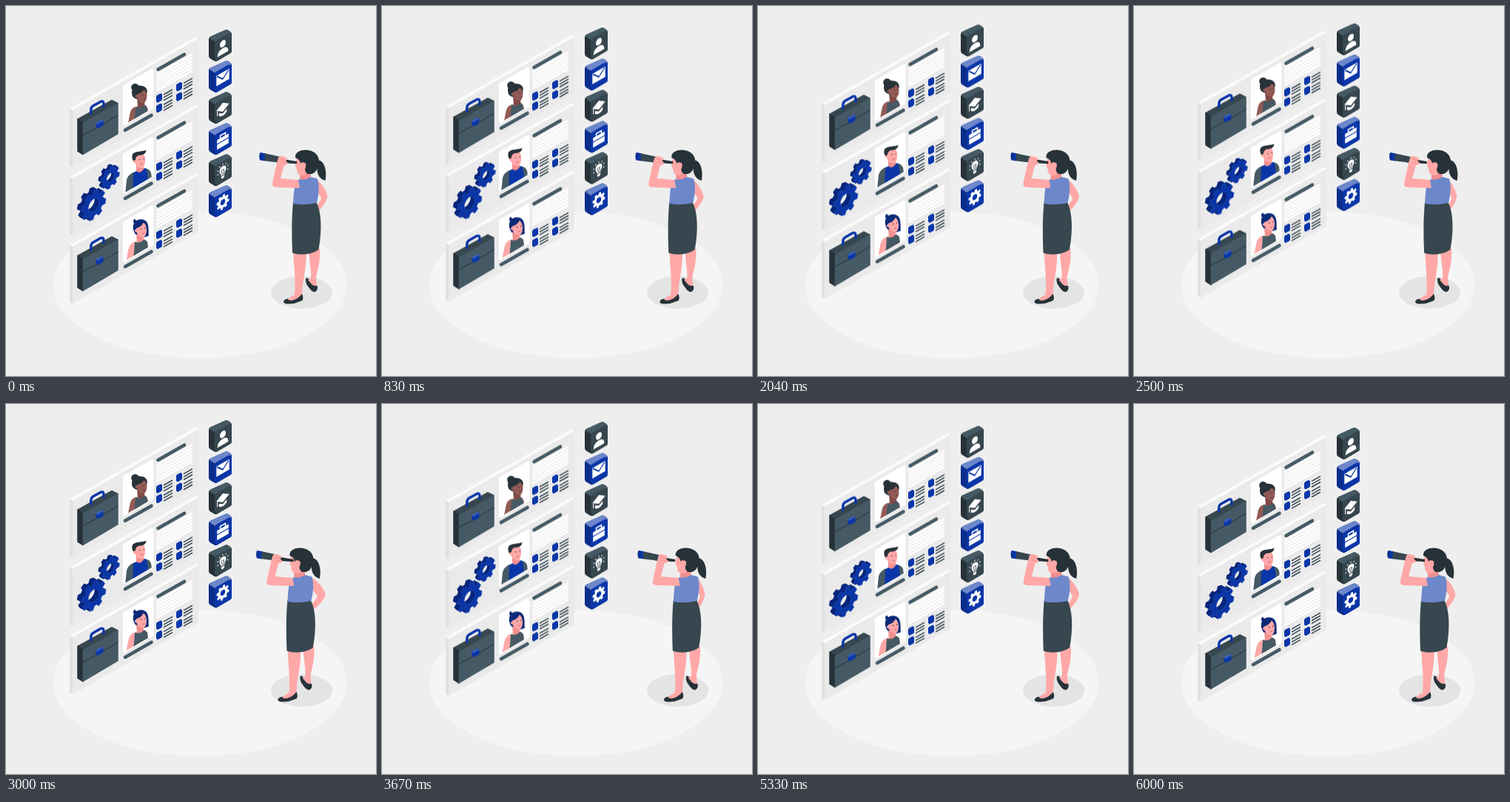
An HTML page for the animation above (6040 ms loop, 500x500 px).

```html
<!DOCTYPE html>
<html lang="en">
<head>
<meta charset="utf-8">
<title>Candidate search</title>
<style>
  @property --sway { syntax: "<number>"; inherits: true; initial-value: 0; }
  html, body { margin: 0; width: 100%; height: 100%; overflow: hidden; background: #eee; }
  svg { display: block; width: 100vw; height: 100vh; }
  .float { animation: float 6040ms linear infinite; }
  .sway { animation: sway 6040ms linear infinite; transform: translateX(calc(var(--sway) * 1.9px)); }
  .scope { transform: translateX(calc(var(--sway) * -.85px)); }
  .elbow { transform-origin: 417px 258px; transform: scaleX(calc(1 - var(--sway) * .07)); }

  /* Six seconds of motion, then a 40 ms hold. */
  @keyframes float {
    0%, 99.34% { transform: translateY(0); }
    49.67% { transform: translateY(-10px); }
  }
  @keyframes sway {
    0%, 99.34%, 100% { --sway: 0; }
    9.93%, 89.4% { --sway: -1; }
    19.87%, 79.47% { --sway: 2; }
    29.8%, 49.67%, 69.54% { --sway: -4; }
    39.74%, 59.6% { --sway: 4; }
  }
</style>
</head>
<body>
<svg viewBox="0 0 500 500">
  <defs>
    <clipPath id="crop"><path d="M158 90H199V137.5L158 161.5Z"/></clipPath>

    <g id="case" stroke-linejoin="round">
      <path d="M97 153 143 127.500 151 131.500 104 158.500Z" fill="#37474f" stroke="#37474f" stroke-width="1.500"/>
      <path d="M97 153 104 158V200.500L97 196Z" fill="#263238" stroke="#263238" stroke-width="1.500"/>
      <path d="M104.500 158.500 151 132V172.500L104.500 200Z" fill="#455a64" stroke="#455a64" stroke-width="1.500"/>
      <path d="M104 174.500 126 163 151.500 147.500" fill="none" stroke="#263238" stroke-width="1"/>
      <path d="M114.800 146.500V140Q115 136.500 118 134.800L128 129.200Q131.800 127.800 132 131.500V137" fill="none" stroke="#0b36a8" stroke-width="3.400"/>
      <path d="M121 158 130 153.500 131.500 155V161.500L124 165.500 121.500 163.500Z" fill="#0b36a8"/>
      <path d="M121 158 130 153.500 131.500 155 123 160Z" fill="#3e62c0"/>
    </g>

    <g id="p0">
      <path d="M164 163 168 143Q170 137 176 136L187 133Q191 135 192 141L193 150Z" fill="#935a55"/>
      <path d="M172 162 174 148 175 136 179 138 187 134 190 136 193 152Z" fill="#455a64"/>
      <path d="M177 124H188L187 134Q182 139 178 136Z" fill="#7f4a47"/>
      <circle cx="174.500" cy="110" r="5.300" fill="#263238"/>
      <path d="M170 117C170 109 178 106 184 108 190 109 191.500 114 190.500 118L178 126Q170 125 170 117Z" fill="#263238"/>
      <path d="M177 119Q184 118 186 113 190 115 190.500 121 190 130 186 131 178 130 177 123Z" fill="#935a55"/>
      <path d="M184 120.500h1.500M188.500 119.500h1.200" stroke="#263238"/>
      <path d="M185.500 126.500 188.500 125.500" stroke="#5d3232" stroke-width=".8"/>
      <circle cx="176.500" cy="122" r="2" fill="#935a55"/>
    </g>

    <g id="p1">
      <path d="M161 163 163 143Q164 137 171 133L188 127Q194 128 196 133L198 148Z" fill="#455a64"/>
      <path d="M171 160 172 134 177 130 187 127 190 128 193 148Z" fill="#0b36a8"/>
      <path d="M176 122H186V128Q182 135 176 131Z" fill="#f28f8f"/>
      <path d="M173 113Q174 107 181 106 188 107 188 114 188.500 125 184 127 176 127 174.500 120Z" fill="#ffa8a7"/>
      <path d="M172.500 118C169.500 113 170 109 172 107 176 103.500 183 105 189.500 102.500 189 107 186 109.500 178.500 109.500L175.500 112.500 174.500 118Z" fill="#263238"/>
      <circle cx="174" cy="118" r="2" fill="#ffa8a7"/>
      <path d="M180 115.500h1.500M185.500 114.500h1.300" stroke="#263238" stroke-width="1.100"/>
      <path d="M181.500 122 185 121" stroke="#b55b5b" stroke-width=".8"/>
    </g>

    <g id="p2">
      <path d="M162 163 165 146Q167 136 174 134L188 131Q192 133 193 150Z" fill="#ffa8a7"/>
      <path d="M171 162 173 149 174 134.500 178 135 187 131 191 134 193 151Z" fill="#455a64"/>
      <path d="M172 112C174 104 184 101 190 107 194 113 192 123 193 126L187 128 175 124Q171 118 172 112Z" fill="#0b2a78"/>
      <path d="M176 124H186V131Q181 137 177 134Z" fill="#f28f8f"/>
      <path d="M176 116Q183 114 186 108 190 112 190 118 190 126 186 128 178 127 176 120Z" fill="#ffa8a7"/>
      <path d="M172.500 109Q171 105 174 103 175 106 180 106" fill="#0b2a78"/>
      <circle cx="176" cy="119" r="2" fill="#ffa8a7"/>
      <path d="M182 117h1.500M187 116h1.300" stroke="#263238" stroke-width="1.100"/>
      <path d="M183.500 123.500 187 122.500" stroke="#b55b5b" stroke-width=".8"/>
    </g>
  </defs>

  <ellipse cx="262" cy="377" rx="198.500" ry="99" fill="#f5f5f5"/>
  <ellipse cx="399.500" cy="387" rx="41.500" ry="22" fill="#e4e4e4"/>
  <g class="float" id="wall"></g>

  <g class="sway">
    <path class="elbow" d="M420 235C426 238 433 250 434.500 257 434 264 426 273 421 279L417 277C420 269 426 263 426 259L419 249Z" fill="#ffa8a7"/>
    <path d="M405 368.500Q407 366 410 370 413 377 419 377L421 379Q421.500 385 417 386.500 413 386 409 380 404.500 375 405 368.500Z" fill="#263238"/>
    <path d="M409 328H424C425 348 421 356 419 367L420 377Q418 380 413 376L408 370 412 368C413 358 410 348 409 328Z" fill="#ffa8a7"/>
    <path d="M388 330H405.500C406.500 350 403 362 401 376L400 391Q398 396 391 397L380 399 379 397 390 390C392 374 389 352 388 330Z" fill="#ffa8a7"/>
    <path d="M375 399.500Q376 396 381 395.500 381 398 386 398 395 396 400 389 402.500 394 400.500 398 398 399 395 400 389 403 380 402.500 375 402 375 399.500Z" fill="#263238"/>
    <path d="M388 265H419.500C426 279 427.500 300 422.500 329 414 336 397 337.500 387 333.500 386 308 386 286 388 265Z" fill="#37474f"/>
    <path d="M397 226 411 223 412 233Q404 239 397 234Z" fill="#f28f8f"/>
    <path d="M396 234Q404 236 412 231L421 233.500Q425 246 420 266 403 270 388 267 389 247 391 240Z" fill="#6d87cb"/>
    <path d="M392 207 404 203 411 216 407 226Q403 230 397 228 393 227 393 220L391 216Z" fill="#ffa8a7"/>
    <path d="M391 205C390 197 399 194 406 194.500 415 195 422 200 423 208.500 431 210 434 225 431.500 236 424 234 420 227 420.500 220 418 226 412 229 406 226L404 222 405 213 400 211 398 213Q397 207 391 205Z" fill="#263238"/>
    <ellipse cx="402.500" cy="215.500" rx="2.800" ry="4" fill="#ffa8a7"/>
    <g class="scope">
      <path d="M366 205.500 393 210V213.200L366 211.500Z" fill="#263238"/>
      <path d="M348 198.800 371 203.800 370 211.800 347 209Z" fill="#37474f"/>
      <path d="M344 198 350.500 199.200Q348.500 204 349.500 209.300L344 208.500Z" fill="#0b36a8"/>
      <ellipse cx="344.300" cy="203.200" rx="2" ry="5.300" fill="#0a2f92"/>
    </g>
    <path d="M366 212 368 205Q370 202 373 203L379 205Q381 208 378 209L381 212Q380 215 376 215L371 233 395 235 397 246 366 245Q359 245 360 239Z" fill="#ffa8a7"/>
    <path d="M371 207 378 209M371.500 211 379 212.500" stroke="#f28f8f" stroke-width=".8"/>
  </g>
</svg>
<script>
  const BLUE = '#0b36a8', NAVY = '#08267c', DARK = '#37474f';
  const SLOPE = -.568;
  const range = n => [...Array(n).keys()];
  const each = (n, draw) => range(n).map(draw).join('');

  const slant = (x, y, w, size, color, cap = 'round') =>
    `<path d="M${x} ${y}l${w} ${w * SLOPE}" stroke="${color}" stroke-width="${size}" stroke-linecap="${cap}"/>`;

  // Filled shape whose corners are rounded by a stroke of the same colour.
  const soft = (d, color, round) =>
    `<path d="${d}" fill="${color}" stroke="${color}" stroke-width="${round}" stroke-linejoin="round"/>`;

  // Toothed ring around the origin.
  function gear(r, hole, teeth = 8) {
    const shape = [[-.34, .76], [-.2, 1], [.2, 1], [.34, .76]];
    const points = range(teeth).flatMap(i => shape.map(([a, k]) => {
      const angle = (i + a) * 2 * Math.PI / teeth + .2;
      return `${(Math.cos(angle) * k * r).toFixed(2)} ${(Math.sin(angle) * k * r).toFixed(2)}`;
    }));
    return `M${points.join('L')}ZM${hole} 0A${hole} ${hole} 0 1 0 ${-hole} 0A${hole} ${hole} 0 1 0 ${hole} 0Z`;
  }

  function solidGear(x, y, r, hole, depth) {
    const layers = depth * 2;
    return each(layers + 1, i => {
      const back = (layers - i) / 2;
      const front = i === layers;
      return `<path d="${gear(r, hole)}" fill="${front ? BLUE : NAVY}" fill-rule="evenodd"
        transform="matrix(.866 -.5 0 1 ${x - back} ${y - back * .55})"
        ${front ? 'stroke="#2f55b8" stroke-width=".5"' : ''}/>`;
    });
  }

  const detail = (x, y) =>
    soft(`M${x + 2} ${y + 2.6}l4 -2.300v5.800l-4 2.300Z`, BLUE, 4)
    + each(3, i => slant(x + 10.5, y - .5 + i * 3.9, 11, 1.5, DARK));

  function board(i) {
    const art = i === 1
      ? solidGear(141, 139.5, 14.5, 6, 4) + solidGear(118.5, 177, 19.2, 8.4, 6)
      : '<use href="#case"/>';
    return `<g transform="translate(0 ${i * 92.2})">
      <path d="M86 138.500 256.500 41.500 260 44 90 141Z" fill="#fafafa"/>
      <path d="M86 138.500 90 141V218L86 215.500Z" fill="#e0e0e0"/>
      <path d="M90 141 260 44.400V121.400L90 218Z" fill="#eaeaea"/>
      ${art}
      ${soft('M160 108.500 197.500 87V137.500L160 159.500Z', '#fff', 4)}
      <g clip-path="url(#crop)"><use href="#p${i}"/></g>
      ${slant(161, 167.8, 35.5, 4.6, '#455a64')}
      ${slant(205.5, 85.7, 35.5, 4.6, '#455a64')}
      ${each(6, k => slant(203, 93 + k * 4.4, 49, 2.7, '#fff', 'butt'))}
      ${detail(203, 120)}${detail(203, 133.5)}${detail(230, 104.7)}${detail(230, 118.2)}
    </g>`;
  }

  const rays = each(7, i => {
    const a = Math.PI * (1 + (i - .5) / 5);
    const at = r => `${(Math.cos(a) * r).toFixed(1)} ${(Math.sin(a) * r - 1).toFixed(1)}`;
    return `<path d="M${at(7.2)}L${at(9.2)}" stroke="#fff" stroke-width="1.200"/>`;
  });

  const glyphs = [
    '<circle cy="-3.500" r="4.600"/><path d="M-8.500 10.500Q-8.500 2.500 0 2.500T8.500 10.500Z"/>',
    '<path d="M-10 -7H10V7H-10Z"/><path d="M-9 -6 0 2 9 -6" fill="none" stroke="#0b36a8" stroke-width="1.600"/>',
    '<path d="M-10 -2 0 -8 10 -2 0 4ZM-6 3 0 6.500 6 3V7Q0 12 -6 7Z"/><path d="M-8.500 -1V6" stroke="#fff" stroke-width="1.200"/>',
    '<path d="M-9 -4H9V1H-9ZM-9 2.300H9V9H-9Z"/><path d="M-4 -4V-7.500H4V-4" fill="none" stroke="#fff" stroke-width="1.800"/>',
    '<path d="M-2.500 5.500C-2.500 2.500 -5.200 2 -5.200 -1.500A5.200 5.200 0 0 1 5.200 -1.500C5.200 2 2.500 2.500 2.500 5.500ZM-2.500 6.500H2.500V8.500L1 10H-1L-2.500 8.500Z"/>'
      + '<path d="M-2 -1.500 -.8 5M2 -1.500 .8 5M-2 -1.500H2" fill="none" stroke="#37474f" stroke-width=".8"/>' + rays,
    `<path d="${gear(10, 3.8)}" fill-rule="evenodd"/>`
  ];

  const palettes = [
    { front: DARK, top: '#455a64', side: '#263238' },
    { front: BLUE, top: '#6d87cb', side: '#0a2d8c' }
  ];

  function tile(glyph, i) {
    const { front, top, side } = palettes[i % 2];
    return `<g transform="translate(0 ${i * 42.1})">
      ${soft('M278 45 298 36 301 38V60.500L283.500 70.800 278 67.500Z', side, 8)}
      ${soft('M277.500 43 297.500 34 302 36.500 284 47Z', top, 4)}
      ${soft('M285.500 50 301.500 40.700V60.500L285.500 70Z', front, 7)}
      <g fill="#fff" transform="matrix(.866 -.5 0 1 293 54.500)">${glyph}</g>
    </g>`;
  }

  document.getElementById('wall').innerHTML = each(3, board) + glyphs.map(tile).join('');
</script>
</body>
</html>
```
